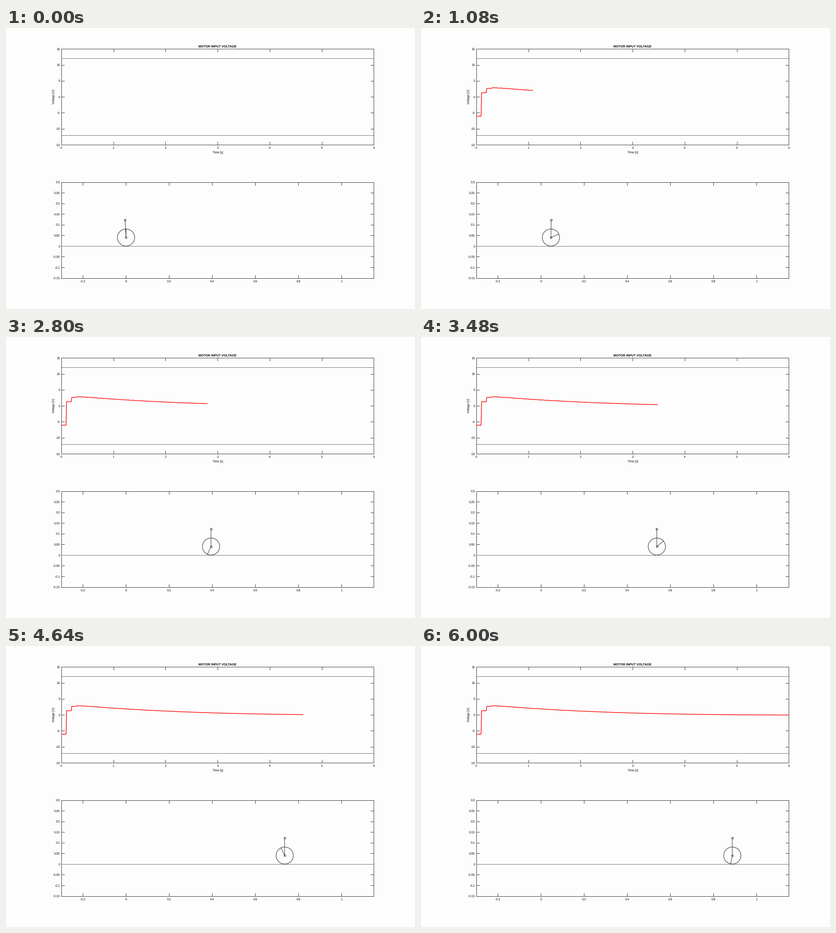
These frames come from a looping animation (901x621 px, 6.04 s). A matplotlib script:

```python
import matplotlib.pyplot as plt
import numpy as np
from matplotlib.animation import FuncAnimation
from matplotlib.patches import Circle

W, H, DPI = 901, 621, 100
FRAMES, STEP = 151, 40
RADIUS, ROD, GRAVITY = 0.04, 0.083, 9.81
GOAL = 1.0
POLE = -0.43 + 0.308j              # slow closed-loop mode
SWING = 2.066 * np.exp(-1.078j)    # its share of the position error
INK, PALE = "#3a3a3a", "#747474"

plt.rcParams["font.family"] = "Liberation Sans"
plt.rcParams["text.hinting"] = "none"


def px(n):
    """Pixels to points."""
    return n * 72 / DPI


def voltage(t):
    """Controller output, held over each 0.1 s."""
    t = np.floor(t * 10 + 1e-6) / 10
    return 3.31 * np.exp(POLE * t).real - 9.36 * np.exp(-16 * t)


def position(t):
    """Wheel centre: slow approach to the goal, starting from rest at 0."""
    start = GOAL - SWING.real
    return GOAL - (SWING * np.exp(POLE * t)).real - start * np.exp(-6 * t)


def lean(t):
    """Body angle: follows the acceleration once the first tilt is caught."""
    def steady(u):
        return -(SWING * POLE**2 * np.exp(POLE * u)).real / GRAVITY
    return steady(t) - (0.05 + steady(0)) * np.exp(-12 * t)


fig = plt.figure(figsize=(W / DPI, H / DPI), dpi=DPI, facecolor="#fdfdfd")


def panel(top, xlim, ylim, xticks, yticks):
    left, width, height = 122, 688.4, 211.8
    ax = fig.add_axes([left / W, 1 - (top + height) / H,
                       width / W, height / H])
    ax.set_facecolor("none")
    ax.set(xlim=xlim, ylim=ylim)
    ax.set_xticks(xticks, [f"{v:g}" for v in xticks])
    ax.set_yticks(yticks, [f"{v:g}" for v in yticks])
    ax.tick_params(direction="in", top=True, right=True, length=px(7),
                   width=px(1), color=INK, labelcolor="black",
                   labelsize=px(6.6))
    ax.tick_params(axis="x", pad=px(4))
    ax.tick_params(axis="y", pad=px(3))
    for side in ax.spines.values():
        side.set(linewidth=px(1), edgecolor=INK)
    return ax


def label(x, y, text, size, **kw):
    fig.text(x / W, 1 - y / H, text, fontsize=px(size), ha="center", **kw)


volts = panel(46.2, (0, 6), (-15, 15), range(7), range(-15, 16, 5))
scene = panel(340.7, (-0.3, 1.15), (-0.15, 0.3),
              np.round(np.arange(-1, 6) * 0.2, 2),
              np.round(np.arange(-3, 7) * 0.05, 2))

label(466.3, 43, "MOTOR INPUT VOLTAGE", 7, weight="bold")
label(466.3, 276.5, "Time [s]", 6.7)
label(104.3, 152.2, "Voltage [V]", 6.7, rotation=90, va="center")

for level in (12, -12):
    volts.axhline(level, color=PALE, lw=px(1))
scene.axhline(0, color=PALE, lw=px(1))

thin = dict(color="black", lw=px(0.8), snap=False)
trace, = volts.plot([], [], color="red", lw=px(1.4), zorder=3, snap=False)
wheel = scene.add_patch(Circle((0, RADIUS), RADIUS, fill=False,
                               ec="black", lw=px(0.85)))
spoke, = scene.plot([], [], **thin)
rod, = scene.plot([], [], marker="o", ms=px(4), mfc="none", mew=px(0.7),
                  **thin)


def draw(i):
    t = i * STEP / 1000
    log = np.arange(4 * i + 1) / 100
    trace.set_data(log, voltage(log))
    x, a = position(t), lean(t)
    turn = x / RADIUS
    wheel.center = (x, RADIUS)
    spoke.set_data([x, x + RADIUS * np.sin(turn)],
                   [RADIUS, RADIUS + RADIUS * np.cos(turn)])
    rod.set_data([x, x + ROD * np.sin(a)], [RADIUS, RADIUS + ROD * np.cos(a)])
    return trace, wheel, spoke, rod


anim = FuncAnimation(fig, draw, frames=FRAMES, interval=STEP, repeat=True)
plt.show()
```
